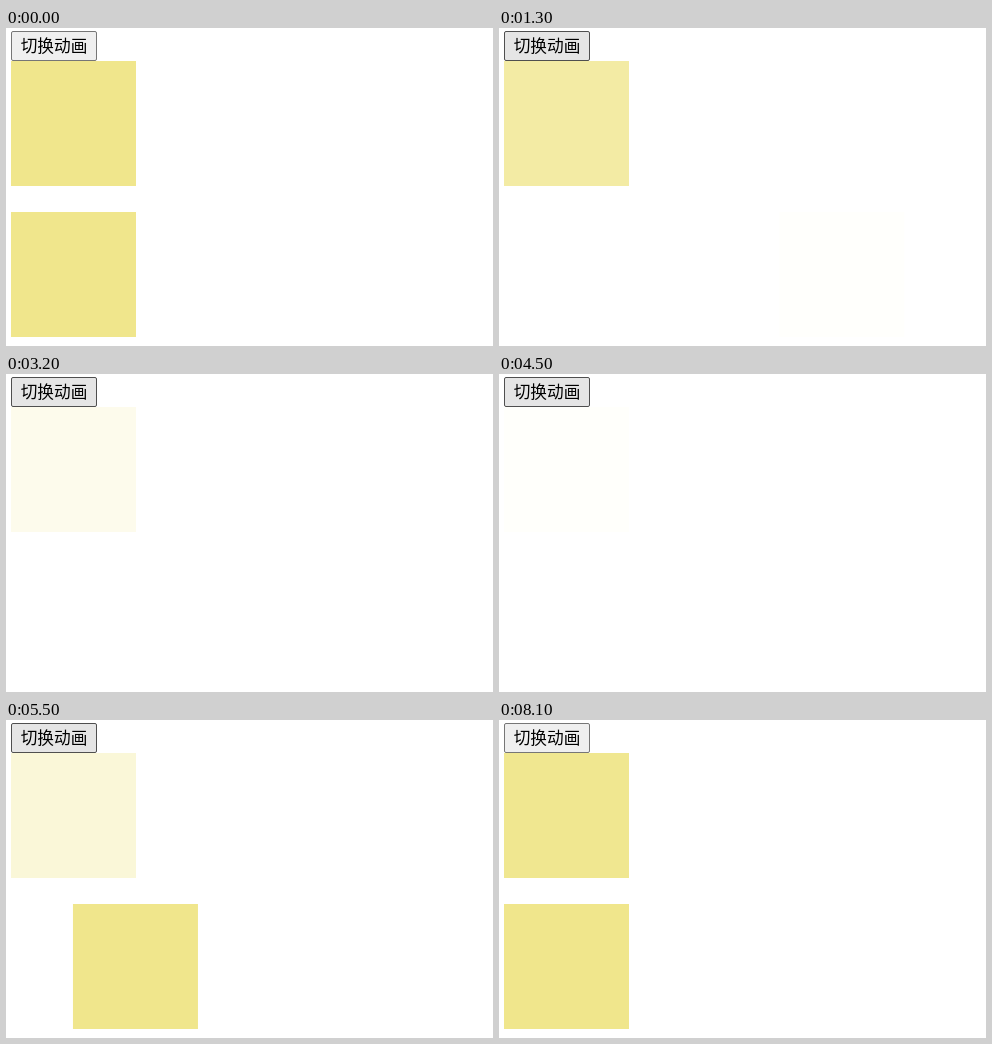
An HTML page that plays this animation: 487x318 px, repeating every 8.9 s.

```html
<!DOCTYPE html>
<html lang="zh">
<head>
<meta charset="utf-8">
<title>切换动画</title>
<style>
  html, body { margin: 0; width: 100%; height: 100%; overflow: hidden; background: #fff; }
  .stage { position: relative; width: 100%; height: 100%; overflow: hidden; contain: strict; }
  .button, .box { position: absolute; left: 5px; }
  .button {
    top: 3px; width: 86px; height: 30px; box-sizing: border-box;
    border: 1px solid #767676; border-radius: 2px; background: #efefef;
    font: 16.67px/27px "Noto Sans CJK SC", "Noto Sans CJK", sans-serif;
    color: #000; text-align: center; white-space: nowrap;
  }
  .button.hover { border-color: #4f4f4f; background: #e5e5e5; }
  .button.active { border-color: #8d8d8d; background: #f5f5f5; }
  .box { width: 125px; height: 125px; background: #f0e68c; }
  #fade { top: 33px; }
  #slide { top: 184px; }
</style>
</head>
<body>
<div class="stage">
  <div class="button" id="toggle">切换动画</div>
  <div class="box" id="fade"></div>
  <div class="box" id="slide"></div>
</div>
<script>
  const LOOP = 8900, STEP = 100;
  const LEAVE = 492, ENTER = 4472;
  const $ = id => document.getElementById(id);
  const toggle = $('toggle'), fade = $('fade'), slide = $('slide');
  const tracks = [];

  function move(el, prop, from, to, delay, duration) {
    const track = el.animate({ [prop]: [from, to] },
      { delay, duration, easing: 'ease', fill: 'forwards' });
    track.pause();
    tracks.push(track);
  }

  const home = 'translateX(0px)', away = 'translateX(400px)';
  move(fade, 'opacity', 1, 0, LEAVE, 5000);
  move(fade, 'opacity', 0.028, 1, ENTER, 4860);
  move(slide, 'opacity', 1, 0, LEAVE, 1000);
  move(slide, 'opacity', 0, 1, ENTER, 1000);
  move(slide, 'transform', home, away, LEAVE, 2000);
  move(slide, 'transform', away, home, ENTER, 1880);

  function buttonState(t) {
    if (t < 200 || t >= 5600) return '';
    return t >= 4400 && t < 4500 ? 'active' : 'hover';
  }

  const start = performance.now();
  function draw() {
    const t = Math.floor((performance.now() - start) % LOOP / STEP) * STEP;
    // The boxes hold still while the button is being pressed.
    const time = t >= 4400 && t < 4700 ? 4400 : t;
    for (const track of tracks) track.currentTime = time;
    toggle.className = 'button ' + buttonState(t);
    requestAnimationFrame(draw);
  }
  draw();
</script>
</body>
</html>
```
